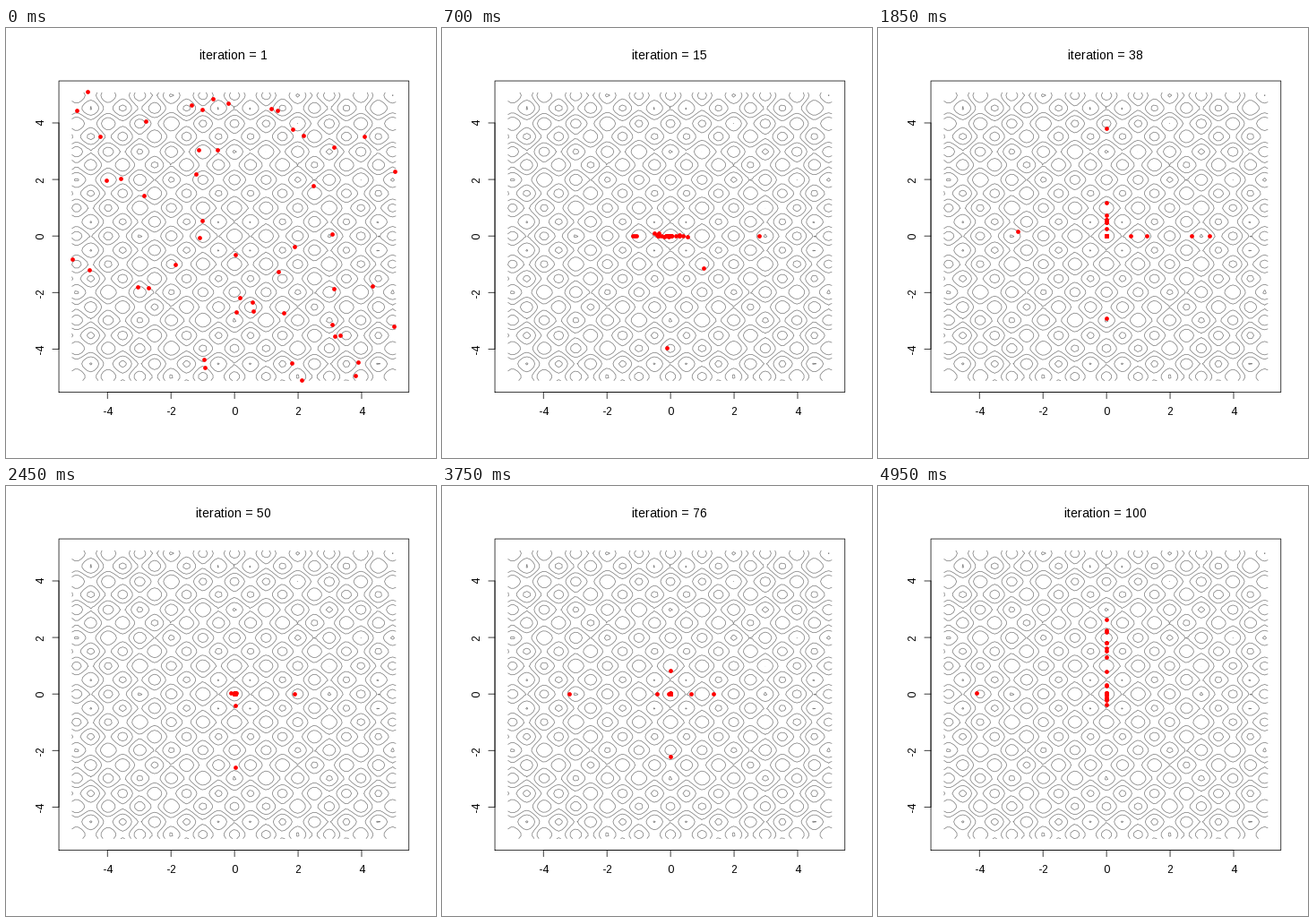
A matplotlib script for the animation above (5000 ms loop, 480x480 px).

```python
import numpy as np
import matplotlib.pyplot as plt
from matplotlib.animation import FuncAnimation
from matplotlib.lines import Line2D
from matplotlib.tri import Triangulation

SIZE, DPI = 480, 72
STEPS, INTERVAL = 100, 50
POP, LIMIT = 50, 5.12
LEFT, RIGHT, TOP, BOTTOM = 59.04, 449.76, 59.04, 406.56
TICK = 7.2

# Whole-pixel glyph advances
plt.rcParams.update({"font.family": "Liberation Sans", "text.hinting_factor": 1})


def rastrigin(x, y):
    return 20 + x**2 + y**2 - 10 * (np.cos(2 * np.pi * x) + np.cos(2 * np.pi * y))


def breed(pop, rng):
    """One generation: selection, blend crossover, uniform mutation, elitism."""
    cost = rastrigin(*pop.T)
    fit = cost.max() - cost + 1e-9
    kids = pop[rng.choice(POP, POP, p=fit / fit.sum())]
    for i in range(0, POP, 2):
        if rng.random() < .8:
            a, p, q = rng.random(2), kids[i].copy(), kids[i + 1].copy()
            kids[i], kids[i + 1] = a * p + (1 - a) * q, a * q + (1 - a) * p
    for kid in kids:
        if rng.random() < .1:
            kid[rng.integers(2)] = rng.uniform(-LIMIT, LIMIT)
    worst = np.argsort(rastrigin(*kids.T))[-2:]
    kids[worst] = pop[np.argsort(cost)[:2]]
    return kids


def evolve(seed):
    rng = np.random.default_rng(seed)
    history = [rng.uniform(-LIMIT, LIMIT, (POP, 2))]
    while len(history) < STEPS:
        history.append(breed(history[-1], rng))
    return history


def settling_cost(history):
    """Typical cost halfway through; low once the swarm sits at the origin."""
    return np.median(rastrigin(*history[37].T))


def draw_contours(ax, grid):
    """Each grid cell is split into four triangles around its mean value."""
    n = len(grid)
    x, y = np.meshgrid(grid, grid)
    z = rastrigin(x, y)

    def mid(v):
        return (v[:-1, :-1] + v[1:, :-1] + v[:-1, 1:] + v[1:, 1:]) / 4

    px, py, pz = (np.append(v.ravel(), mid(v).ravel()) for v in (x, y, z))
    ids = np.arange(n * n).reshape(n, n)
    corners = [ids[:-1, :-1], ids[:-1, 1:], ids[1:, 1:], ids[1:, :-1]]
    centre = n * n + np.arange((n - 1) ** 2)
    tris = [np.column_stack([corners[k].ravel(), corners[(k + 1) % 4].ravel(), centre])
            for k in range(4)]
    ax.tricontour(Triangulation(px, py, np.vstack(tris)), pz,
                  levels=range(10, 90, 10), colors="#808080", linewidths=.75)


fig = plt.figure(figsize=(SIZE / DPI, SIZE / DPI), dpi=DPI, facecolor="white")


def stroke(xs, ys):
    """Thin black line through stage pixels, without snapping."""
    line = Line2D(np.array(xs) / SIZE, 1 - np.array(ys) / SIZE, color="black",
                  lw=.75, solid_capstyle="round", solid_joinstyle="round",
                  transform=fig.transFigure)
    line.set_snap(False)
    fig.add_artist(line)


def label(x, y, text, size=12, **style):
    return fig.text(x / SIZE, 1 - y / SIZE, text, size=size, ha="center",
                    va="baseline", rotation_mode="anchor", **style)


ax = fig.add_axes([LEFT / SIZE, 1 - BOTTOM / SIZE,
                   (RIGHT - LEFT) / SIZE, (BOTTOM - TOP) / SIZE])
ax.axis("off")
grid = np.arange(-LIMIT, LIMIT, .1)
draw_contours(ax, grid)
pad = .04 * (grid[-1] - grid[0])
low, high = grid[0] - pad, grid[-1] + pad
ax.set(xlim=(low, high), ylim=(low, high))


def to_x(v):
    return LEFT + (v - low) / (high - low) * (RIGHT - LEFT)


def to_y(v):
    return BOTTOM - (v - low) / (high - low) * (BOTTOM - TOP)


stroke([LEFT, RIGHT, RIGHT, LEFT, LEFT], [BOTTOM, BOTTOM, TOP, TOP, BOTTOM])
stroke([to_x(-4), to_x(4)], [BOTTOM, BOTTOM])
stroke([LEFT, LEFT], [to_y(-4), to_y(4)])
for t in range(-4, 5, 2):
    stroke([to_x(t)] * 2, [BOTTOM, BOTTOM + TICK])
    stroke([LEFT, LEFT - TICK], [to_y(t)] * 2)
    label(to_x(t), 432.3, str(t))
    label(41.8, to_y(t), str(t), rotation=90)

title = label((LEFT + RIGHT) / 2, 34.8, "", size=14)
dots = ax.scatter([], [], s=4.75**2, color="red", linewidths=0, zorder=3)
history = min(map(evolve, range(6)), key=settling_cost)


def update(i):
    title.set_text(f"iteration = {i + 1}")
    dots.set_offsets(history[i])
    return title, dots


anim = FuncAnimation(fig, update, frames=STEPS, interval=INTERVAL,
                     repeat=True, repeat_delay=0)
plt.show()
```
